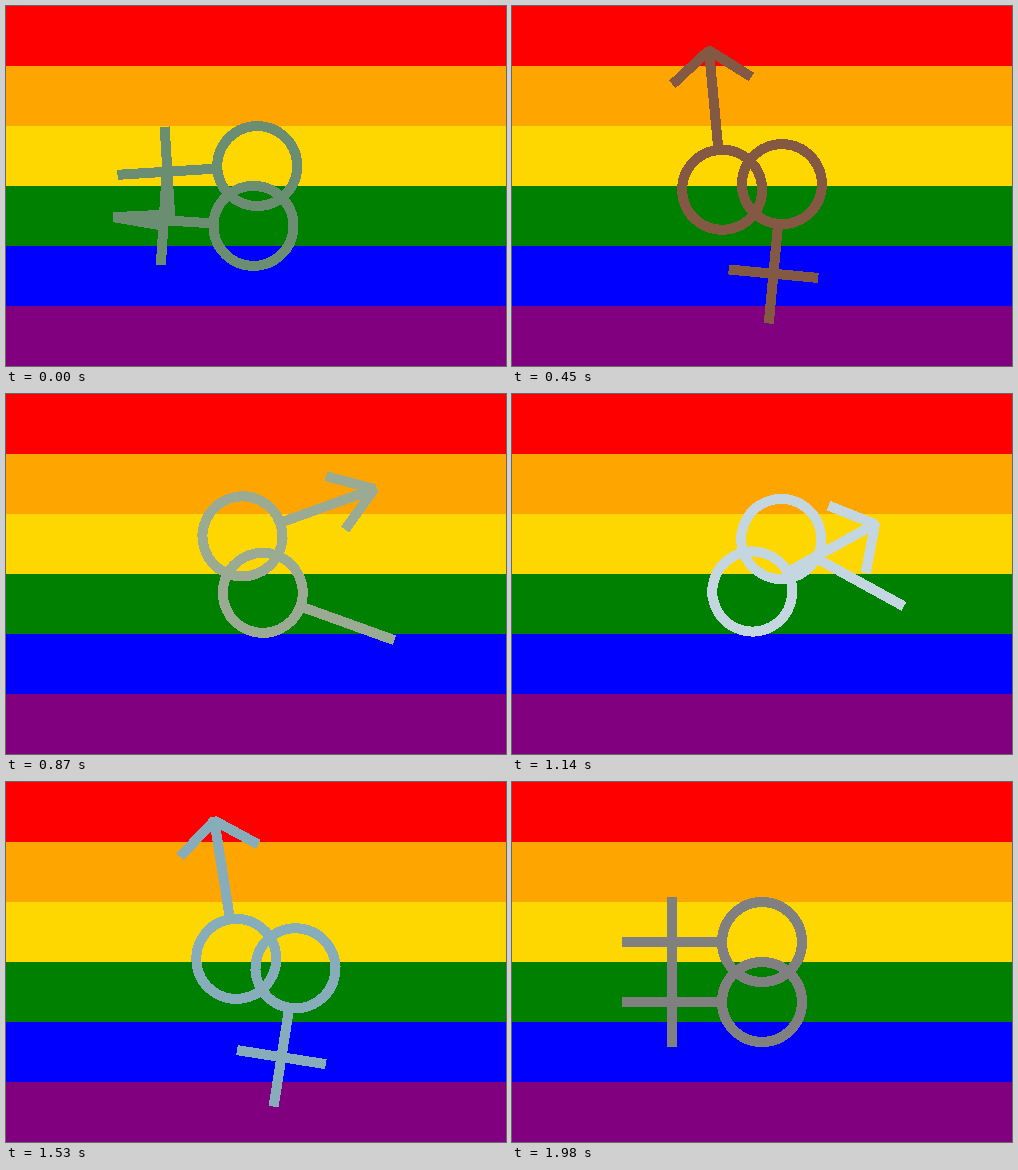
These frames come from a looping animation (500 by 360 pixels, 2010 ms). An HTML page:

```html
<!DOCTYPE html>
<html lang="en">
<head>
<meta charset="utf-8">
<title>Turning symbols</title>
<style>
  html, body { margin: 0; width: 100%; height: 100%; overflow: hidden; }
  svg { display: block; width: 500px; height: 360px; }
</style>
</head>
<body>
<svg viewBox="0 0 500 360" shape-rendering="crispEdges">
  <g id="stripes"></g>
  <g id="pair" fill="none" stroke="gray" stroke-width="10" stroke-linejoin="bevel"></g>
</svg>
<script>
const LOOP = 2010, STEP = 30, OFFSET = 20, TURN = 2000;
const OPEN = 52.5 * Math.PI / 180;
const pair = document.getElementById('pair');

document.getElementById('stripes').innerHTML =
  ['red', 'orange', 'gold', 'green', 'blue', 'purple']
    .map((c, i) => `<rect y="${i * 60}" width="500" height="60" fill="${c}"/>`).join('');

// Drifts from gray through these colours and back to gray
const tint = pair.animate([
  { offset: .01, stroke: '#6b8e72' },
  { offset: .145, stroke: '#8f2d35' },
  { offset: .325, stroke: '#768550' },
  { offset: .58, stroke: '#c4d6df' },
  { offset: .685, stroke: '#9c7ba6' },
  { offset: .85, stroke: '#74d6c8' }
], { duration: TURN, fill: 'both' });
tint.pause();

// Symbol pointing left: head opens the arrow, bar scales the cross
function symbol(y, transform, head, bar) {
  const x = 110 + 50 * Math.cos(head * OPEN);
  const dy = 50 * Math.sin(head * OPEN);
  const half = 45 * bar;
  return `<g transform="${transform}">
    <circle cx="250" cy="${y}" r="40"/>
    <path d="M210 ${y}H110M160 ${y - half}V${y + half}"/>
    <path d="M${x} ${y - dy}L110 ${y}L${x} ${y + dy}"/>
  </g>`;
}

function draw(now) {
  const time = Math.floor(now % LOOP / STEP) * STEP + OFFSET;
  const angle = time / TURN * 360;
  // Each change fills one twelfth of the turn
  const ramp = start => Math.min(1, Math.max(0, time / TURN * 12 - start));
  const orbit = `rotate(${angle} 250 180)`;

  tint.currentTime = time;
  pair.innerHTML =
    symbol(220, orbit, ramp(0) - ramp(5), 1 - ramp(1) + ramp(8)) +
    symbol(160, `${orbit} rotate(${-2 * angle} 250 160)`,
      ramp(6) - ramp(11), 1 - ramp(3) + ramp(10));
}

const begin = performance.now();
function tick() {
  draw(performance.now() - begin);
  requestAnimationFrame(tick);
}
tick();
</script>
</body>
</html>
```
